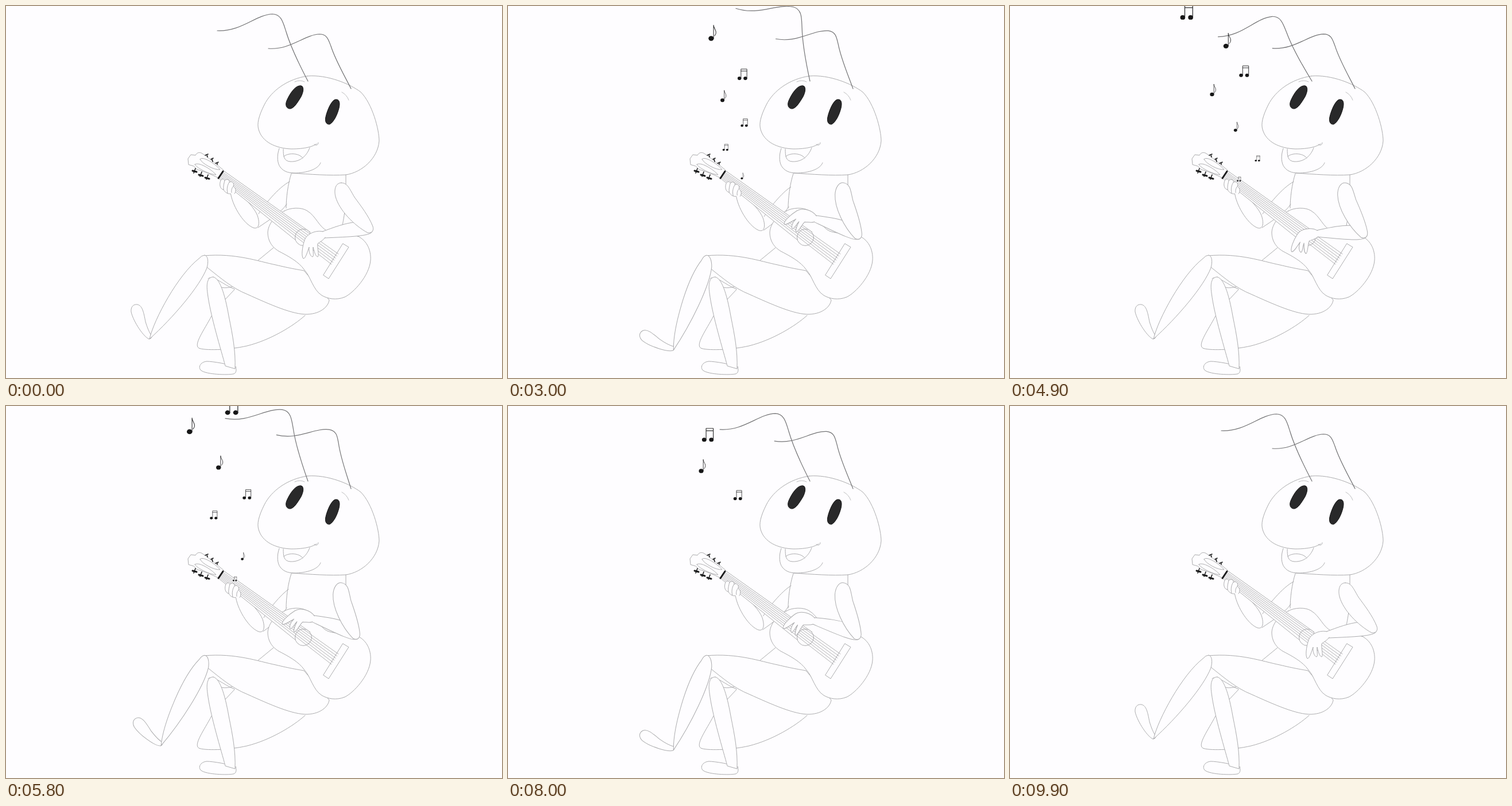
Recreate the animation shown at these times as an HTML page. Size 864 by 648 pixels, loop 10 s.

```html
<!DOCTYPE html>
<html lang="en">
<head>
<meta charset="utf-8">
<title>Ant with guitar</title>
<style>
  html, body { margin: 0; width: 100%; height: 100%; overflow: hidden; background: #fefdff; }
  svg { display: block; width: 864px; height: 648px; }
  path, circle, ellipse { fill: none; stroke: #acacae; stroke-width: 1; stroke-linecap: round; stroke-linejoin: round; }
  .skin { fill: #fefdff; }
  .soft { stroke: #bebec0; }
  .string { stroke: #98989a; stroke-width: .75; }
  .feeler { stroke: #737375; stroke-width: 1.2; }
  .eye { fill: #29292a; stroke: #161617; }
  .peg { stroke: #1c1c1d; stroke-width: 3; }
  .pin { stroke: #1c1c1d; stroke-width: 1.6; }
  .ink { fill: #161617; stroke: none; }
  .stem { stroke: #2c2c2d; stroke-width: 1.1; }
</style>
</head>
<body>
<svg viewBox="0 0 864 648">
  <defs>
    <g id="single">
      <ellipse class="ink" cx="-1" cy="10" rx="5" ry="4.5"/>
      <path class="stem" d="M3.5 10V-15C4-8 9-6 8 0C7.6 3 6 4 5.5 5"/>
    </g>
    <g id="pair">
      <ellipse class="ink" cx="-6.5" cy="8" rx="3.8" ry="3.4"/>
      <ellipse class="ink" cx="5.6" cy="8" rx="3.8" ry="3.4"/>
      <path class="stem" d="M-3.3 8V-11H8.8V8M-3.3-7H8.8"/>
    </g>
  </defs>

  <!-- abdomen, torso -->
  <path d="M358 540C345 565 326 590 336 596C345 600 385 600 420 592C460 582 500 558 521 539"/>
  <path d="M466 421L438 444M352 475C360 467 380 487 398 493M374 490C384 492 390 490 397 488M382 511L398 494"/>
  <path d="M497 292C491 310 488 335 488 352M592 294V314M592 344C590 360 588 372 586 382"/>

  <!-- head -->
  <path class="skin" d="M476 248C471 262 473 275 478 281C485 290 495 291 505 291C530 290 545 282 548 273"/>
  <path d="M525 122C560 119 600 136 618 150C638 170 650 215 650 235C648 265 620 290 592 294C565 296 530 293 497 291"/>
  <path d="M525 122C490 127 462 148 450 172C440 192 437 205 440 215C446 237 470 248 497 249C520 249 535 245 541 240M537 241Q543 245 544 238"/>
  <path d="M483 249C483 262 484 270 495 271C515 272 525 258 529 247M484 262C490 256 510 255 517 265"/>
  <path class="soft" d="M503 132Q512 128 520 132M585 150Q594 155 597 164"/>
  <path class="eye" d="M516 140C519 143 518 150 514 158C508 168 502 178 495 179C488 179 486 172 489 165C494 153 503 140 511 139Q514 138 516 140Z"/>
  <path class="eye" d="M577 163C581 164 582 170 580 178C577 190 571 202 564 206C558 207 555 201 557 193C560 180 567 165 573 163Z"/>
  <path class="feeler" id="feelerA" d="M368 43C410 45 435 15 464 14C480 14 483 30 488 45C497 75 515 110 526 131"/>
  <path class="feeler" id="feelerB" d="M457 74C495 77 520 50 546 49C560 49 562 60 566 70C574 95 590 122 601 144"/>

  <!-- far arm -->
  <path id="farUpper"/>
  <path id="farFore" class="skin" d="M391 324C393 345 412 378 430 386C440 390 443 380 438 365C433 352 418 337 406 326"/>

  <!-- thigh and legs -->
  <path class="skin" d="M345 435C400 430 440 445 470 451C495 457 508 459 519 461L563 512C562 522 550 536 525 537C500 538 460 520 420 502C395 492 375 475 350 455"/>
  <g id="shin">
    <g id="foot">
      <path class="skin" d="M249 580C240 577 222 550 218 533C217 524 222 519 229 520C238 522 240 535 243 550C246 560 250 570 254 575Q254 580 249 580"/>
    </g>
    <path class="skin" d="M346 434C352 435 353 445 350 456C338 488 291 543 250 580C258 545 300 468 336 440Q341 434 346 434"/>
  </g>
  <path class="skin" d="M401 629C390 624 360 619 350 619C338 620 334 630 340 635C350 642 385 643 396 641C401 640 402 634 400 629"/>
  <path class="skin" d="M361 472C350 472 349 485 351 500C356 540 375 600 382 627L399 632C400 600 395 575 388 540C381 500 372 474 361 472"/>

  <!-- guitar -->
  <path class="skin" d="M485 357C495 351 515 350 525 357C540 366 545 385 560 392C575 398 600 395 615 402C632 412 636 430 635 443C633 470 605 500 590 507C575 513 560 510 550 504C535 495 530 470 520 460C510 445 490 435 475 427C460 418 456 405 456 394C457 380 468 365 485 357Z"/>
  <path class="skin" d="M379 287L530 394L506 409L370 300Z"/>
  <circle class="skin" cx="518" cy="403" r="14.5"/>
  <path class="skin" d="M587 414L597 420L562 475L553 469Z"/>
  <g id="strings"></g>
  <path class="skin" d="M318 276L317 266L322 259L330 260C333 255 337 254 342 257C352 264 362 272 379 286L371 300C357 293 342 287 333 285L327 279Z"/>
  <path d="M338 267C342 260 366 276 373 285C362 286 342 275 338 267M329 276C335 271 356 283 366 294C354 293 333 283 329 276"/>
  <path class="peg" d="M378 288L370 300M325 287L332 289M336 294L343 296M347 299L354 301"/>
  <path class="pin" d="M330 283L327 291M341 289L338 297M352 294L349 302M347 260L352 258M357 267L361 265M365 274L370 272M350 259L351 263M359 267L360 271M368 273L368 276"/>

  <g id="farHand">
    <path class="skin" d="M391 327C386 328 381 324 379 320C373 319 371 311 374 304C376 300 381 301 381 304C385 300 390 303 389 307C394 304 398 309 396 314C401 317 401 324 398 327"/>
    <path d="M379 320C378 314 380 308 381 304M386 326C384 318 386 311 389 307M393 325C392 320 394 316 396 314"/>
  </g>

  <!-- near arm -->
  <g id="upper">
    <g id="fore">
      <path class="skin" d="M551 393C570 386 590 378 612 376C630 378 641 385 638 393C634 401 600 402 555 404"/>
      <g id="hand">
        <path class="skin" d="M552 393C541 390 524 396 520 408C516 420 514 436 518 440C522 440 525 428 528 420C527 428 530 436 534 437C537 435 534 426 535 420C537 428 539 436 543 437C546 434 542 422 543 414C548 410 553 408 556 403"/>
      </g>
    </g>
    <path class="skin" d="M584 308C574 308 571 320 574 332C580 355 606 382 630 395C638 396 641 391 639 384C632 366 618 348 607 333C598 318 595 308 584 308Z"/>
  </g>

  <g id="notes"></g>
</svg>

<script>
const $ = id => document.getElementById(id);
const SVG = "http://www.w3.org/2000/svg";

function add(parent, tag, attrs) {
  const el = document.createElementNS(SVG, tag);
  for (const k in attrs) el.setAttribute(k, attrs[k]);
  return $(parent).appendChild(el);
}

// Smooth curve through [time, value] keys that never overshoots at turning points
function track(keys) {
  const slope = i => {
    const a = keys[i - 1], b = keys[i], c = keys[i + 1];
    if (!a || !c || (b[1] - a[1]) * (c[1] - b[1]) <= 0) return 0;
    return (c[1] - a[1]) / (c[0] - a[0]);
  };
  return t => {
    let i = 0;
    while (i < keys.length - 2 && t > keys[i + 1][0]) i++;
    const [t0, v0] = keys[i], [t1, v1] = keys[i + 1];
    const d = t1 - t0, u = Math.min(1, (t - t0) / d), w = 1 - u;
    return v0 * (1 + 2 * u) * w * w + v1 * (3 - 2 * u) * u * u
      + d * u * w * (slope(i) * w - slope(i + 1) * u);
  };
}

const feelerA = track([[0, 0], [.5, 6.2], [1.2, -3], [1.8, 6.4], [2.1, 7.2], [2.8, 16],
  [4.1, 1.9], [4.8, -4], [5.8, 8.1], [6.6, 15.5], [7.1, 12.8], [8.7, -4.7], [8.8, -4.5], [9.9, 0]]);
const slide = track([[0, 0], [1.4, 1], [1.8, .5], [2.2, 0], [4, 1], [4.1, 1], [4.8, 0],
  [5.8, .6], [6.4, 1], [7.1, .06], [7.3, 0], [8.8, .94], [9, 1], [9.9, 0]]);
const tap = track([[0, 0], [.5, 1], [1.15, 0], [1.8, 1], [2.4, 0], [3, 1], [3.6, 0],
  [4.1, .96], [4.2, 1], [4.9, 0], [5.5, 1], [5.8, .54], [6.2, 0], [6.75, 1], [7.1, .56],
  [7.45, 0], [8, 1], [8.6, 0], [8.8, .28], [9.2, 1], [9.9, 0]]);

// Strumming poses: rotation of upper arm, forearm and hand
const pose = {
  rest: [0, 0, 0], mid: [16.8, 15.4, 21], low: [3.7, -8.2, -5.6],
  high: [17.2, 28.2, 40], out: [-6.9, 10.3, 14], down: [5.1, -6.1, 3]
};
const strum = [[0, "rest"], [.6, "mid"], [1.2, "down"], [1.8, "mid"], [2.4, "rest"], [3, "high"],
  [3.5, "rest"], [4.1, "low"], [4.7, "mid"], [5.2, "down"], [5.8, "high"], [6.4, "low"], [7.1, "out"],
  [7.6, "mid"], [8.2, "high"], [8.8, "down"], [9.3, "mid"], [9.9, "rest"]];
const arm = [0, 1, 2].map(j => track(strum.map(([t, name]) => [t, pose[name][j]])));

// Notes: shape, time, x and y at that time, sideways drift per pixel of rise, speed in px/s
const notes = [
  ["single", 1.8, 392, 196, .25], ["pair", 1.8, 428, 268, .13], ["single", 1.8, 408, 306, .227],
  ["pair", 4.1, 394, 67, .13], ["pair", 4.1, 338, 110, .3], ["single", 4.1, 390, 160, .13],
  ["pair", 4.1, 421, 213, .13], ["single", 4.1, 381, 246, .286], ["single", 5.8, 371, 99, .2],
  ["pair", 5.8, 420, 154, .1], ["pair", 5.8, 362, 190, .33], ["single", 5.8, 412, 262, .15],
  ["pair", 7.1, 369, 153, .2, 114], ["single", 7.1, 374, 210, .35, 116.5], ["pair", 7.1, 415, 267, .13]
].map(([kind, at, x, y, lean, speed = 124]) =>
  ({ kind, at, x, y, lean, speed, el: add("notes", "use", { href: "#" + kind }) }));

for (let i = 0; i < 6; i++) {
  const k = i / 5;
  add("strings", "path", {
    class: "string",
    d: `M${377.5 - 6 * k} ${289.5 + 9 * k}L${579 - 12 * k} ${432 + 18 * k}`
  });
}

const turn = (id, angle, x, y) => $(id).setAttribute("transform", `rotate(${angle} ${x} ${y})`);
const shift = (id, x, y) => $(id).setAttribute("transform", `translate(${x} ${y})`);

function draw(t) {
  const p = slide(t), dx = 15 * p, dy = 11 * p;
  turn("feelerA", feelerA(t), 526, 131);
  turn("feelerB", 16.6 * p, 600, 144);
  shift("farHand", dx, dy);
  shift("farFore", dx, dy);
  $("farUpper").setAttribute("d",
    `M${494 - 3 * p} ${306 + 22 * p}C${475 + 6 * p} ${315 + 22 * p} ${447 + dx} ${350 + dy} ${440 + dx} ${362 + dy}` +
    `M${439 + dx} ${386 + dy}C${455 + dx} ${375 + dy} 480 ${360 + dy} 489 ${345 + dy}`);

  const bend = -14.2 * tap(t);
  turn("shin", bend, 347, 436);
  turn("foot", bend * 1.73, 250, 580);

  const [u, f, h] = arm.map(a => a(t));
  turn("upper", u, 584, 316);
  turn("fore", f - u, 635, 391);
  turn("hand", h - f, 552, 398);

  for (const n of notes) {
    const rise = n.speed * (t - n.at), y = n.y - rise, x = n.x - n.lean * rise;
    const size = n.kind === "single" ? (31 - .065 * y) / 30 : (28 - .064 * y) / 24;
    n.el.style.display = y > 308 || y < -5 ? "none" : "";
    n.el.setAttribute("transform", `translate(${x} ${y}) scale(${size})`);
  }
}

const start = performance.now();
function tick() {
  const step = Math.floor((performance.now() - start) / 100) % 100;
  draw(step / 10);
  requestAnimationFrame(tick);
}
tick();
</script>
</body>
</html>
```
